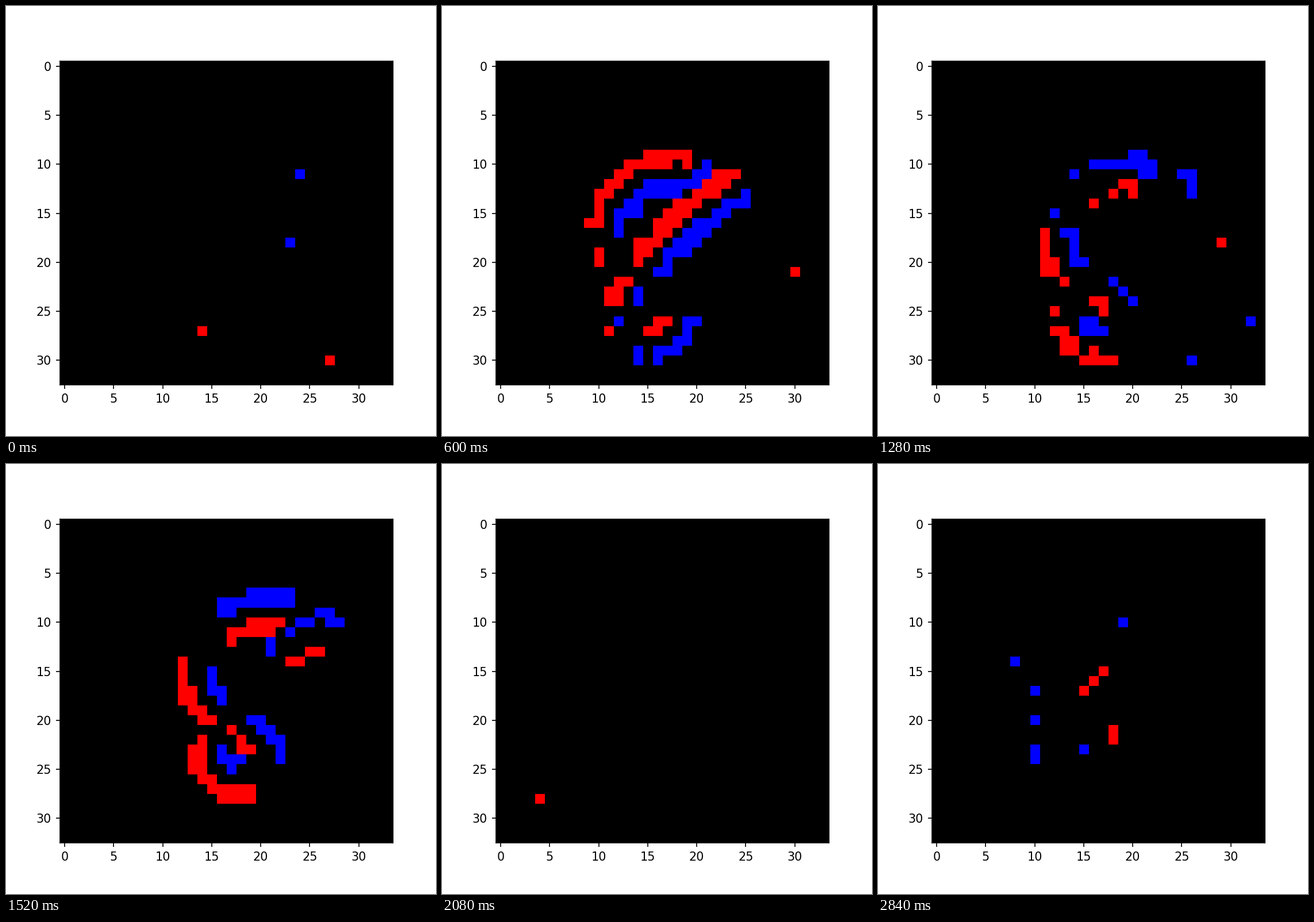
Animation of 748x748 px, one loop 2880 ms. Source, as a matplotlib script:

```python
import numpy as np
import matplotlib.pyplot as plt
from matplotlib.animation import FuncAnimation

ROWS, COLS = 33, 34
FRAMES, INTERVAL = 72, 40
RED, BLUE = (1, 0, 0), (0, 0, 1)
HALF_WIDTH, SOFT = 1.45, 1.1

# key points of the handwritten 8, in one pen stroke
STROKE = np.array([(21, 6.8), (16, 8.2), (13, 12), (14, 16), (17.6, 18.6),
                   (20, 22), (17, 24.5), (14.4, 21.5), (16.2, 17.9),
                   (20.2, 13.2), (25.6, 8.7)])

# the digit is swept along a triangle: down, up to the right, back left
CORNERS = np.array([(-4.6, 0.6), (-1.4, 4.6), (1.7, 0), (-3.4, 0.2)])
STARTS = (0, 25, 49)
DURATIONS = (23, 24, 27)


def spline(points, steps=24):
    """Catmull-Rom curve through the points."""
    p = np.vstack([2 * points[0] - points[1], points,
                   2 * points[-1] - points[-2]])
    t = np.linspace(0, 1, steps)[:, None]
    return np.vstack([
        b + t * (c - a) / 2 + t**2 * (a - 2.5 * b + 2 * c - d / 2)
        + t**3 * (1.5 * (b - c) + (d - a) / 2)
        for a, b, c, d in zip(p, p[1:], p[2:], p[3:])])


LINE = spline(STROKE)
GRID_Y, GRID_X = np.mgrid[0:ROWS, 0:COLS]


def offset(t):
    """Displacement of the digit at time t, in frames."""
    pos = CORNERS[0].copy()
    for start, length, step in zip(STARTS, DURATIONS, np.diff(CORNERS, axis=0)):
        u = np.clip((t - start) / length, 0, 1)
        pos += step * (u - np.sin(2 * np.pi * u) / (2 * np.pi))
    return pos


def brightness(t):
    px, py = (LINE + offset(t)).T
    d = np.hypot(GRID_X[..., None] - px, GRID_Y[..., None] - py).min(axis=-1)
    r = np.clip((HALF_WIDTH + SOFT - d) / (2 * SOFT), 0, 1)
    return r * r * (3 - 2 * r)


def events(frame):
    """Blue where a cell gets brighter, red where it gets darker."""
    rng = np.random.default_rng(frame)
    change = brightness(frame + 0.5) - brightness(frame - 0.5)
    limit = rng.uniform(0.03, 0.17, change.shape)
    img = np.zeros((ROWS, COLS, 3))
    img[change > limit] = BLUE
    img[change < -limit] = RED
    for _ in range(rng.poisson(2)):
        cell = rng.integers(1, ROWS), rng.integers(1, COLS)
        img[cell] = RED if rng.random() < 0.65 else BLUE
    return img


fig, ax = plt.subplots(figsize=(5, 5), dpi=149.6)
picture = ax.imshow(events(0), interpolation="nearest")
ax.set_xticks(range(0, COLS, 5))
ax.set_yticks(range(0, ROWS, 5))


def update(frame):
    picture.set_data(events(frame))
    return (picture,)


anim = FuncAnimation(fig, update, frames=FRAMES, interval=INTERVAL,
                     repeat=True, repeat_delay=0)
plt.show()
```
